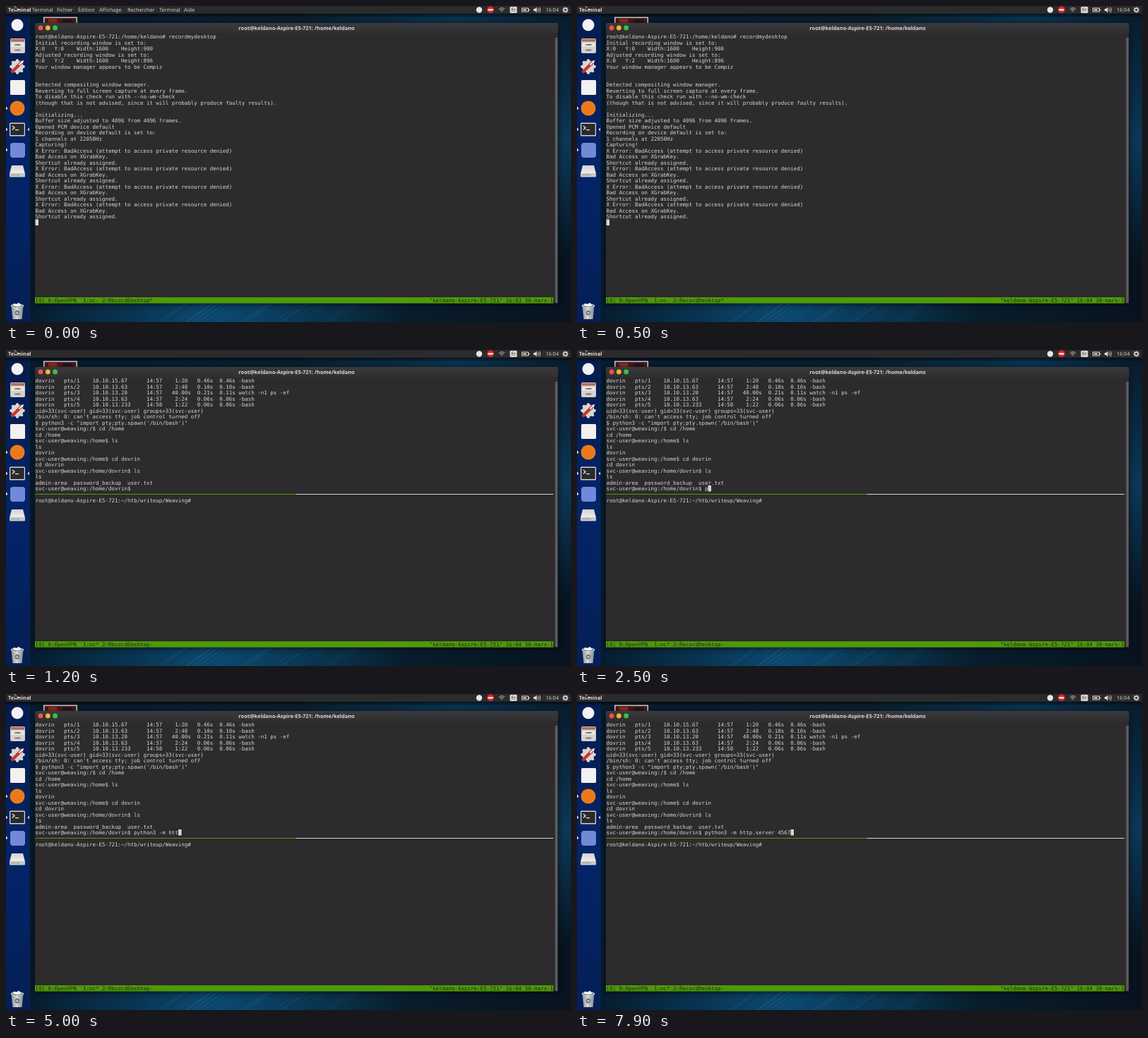
Animation of 800x448 px, one loop 8 s. Source, as an HTML page with a canvas:

```html
<!DOCTYPE html>
<html lang="fr">
<head>
<meta charset="utf-8">
<title>Terminal</title>
<style>
html, body { margin: 0; width: 100%; height: 100%; overflow: hidden; background: #071522; }
canvas { display: block; width: 800px; height: 448px; }
</style>
</head>
<body>
<canvas id="stage" width="800" height="448"></canvas>
<script>
const ctx = document.getElementById('stage').getContext('2d');
const LOOP = 8000;
const CELL = { x: 41.5, y: 39, w: 4.5, h: 8.5, cols: 163 };
const MONO = '14.95px "DejaVu Sans Mono", monospace';
const SANS = '14.6px "Open Sans", sans-serif';
const BOLD = 'bold 14.8px "Open Sans", sans-serif';
const INK = '#d6d6d4', DARK = '#2d2b2e', GREEN = '#4e9a06';

const HOST = 'root@keldano-Aspire-E5-721:';
const SHELL = 'svc-user@weaving:';

const denied = [
  'X Error: BadAccess (attempt to access private resource denied)',
  'Bad Access on XGrabKey.',
  'Shortcut already assigned.'
];
const recordLog = [
  HOST + '/home/keldano# recordmydesktop',
  'Initial recording window is set to:',
  'X:0   Y:0    Width:1600    Height:900',
  'Adjusted recording window is set to:',
  'X:0   Y:2    Width:1600    Height:896',
  'Your window manager appears to be Compiz',
  '', '',
  'Detected compositing window manager.',
  'Reverting to full screen capture at every frame.',
  'To disable this check run with --no-wm-check',
  '(though that is not advised, since it will probably produce faulty results).',
  '',
  'Initializing...',
  'Buffer size adjusted to 4096 from 4096 frames.',
  'Opened PCM device default',
  'Recording on device default is set to:',
  '1 channels at 22050Hz',
  'Capturing!',
  ...denied, ...denied, ...denied, ...denied
];

const session = (pts, ip, login, idle, jcpu, pcpu, what) =>
  'dovrin'.padEnd(9) + ('pts/' + pts).padEnd(9) + ip.padEnd(17) + login.padEnd(8) +
  idle + jcpu.padStart(7) + pcpu.padStart(7) + ' ' + what;
const shellLog = [
  session(1, '10.10.15.67', '14:57', ' 1:20 ', '0.46s', '0.46s', '-bash'),
  session(2, '10.10.13.63', '14:57', ' 2:48 ', '0.10s', '0.10s', '-bash'),
  session(3, '10.10.13.20', '14:57', '40.00s', '0.21s', '0.11s', 'watch -n1 ps -ef'),
  session(4, '10.10.13.63', '14:57', ' 2:24 ', '0.06s', '0.06s', '-bash'),
  session(5, '10.10.13.233', '14:58', ' 1:22 ', '0.06s', '0.06s', '-bash'),
  'uid=33(svc-user) gid=33(svc-user) groups=33(svc-user)',
  "/bin/sh: 0: can't access tty; job control turned off",
  `$ python3 -c "import pty;pty.spawn('/bin/bash')"`,
  SHELL + '/$ cd /home',
  'cd /home',
  SHELL + '/home$ ls',
  'ls',
  'dovrin',
  SHELL + '/home$ cd dovrin',
  'cd dovrin',
  SHELL + '/home/dovrin$ ls',
  'ls',
  'admin-area  password_backup  user.txt'
];
const PROMPT = SHELL + '/home/dovrin$ ';
const COMMAND = 'python3 -m http.server 4567';
// Time of each keystroke of COMMAND
const KEYS = [
  2500, 2600, 2700, 2800, 2900, 3000, 3600, 3800, 3900,
  4300, 4500, 4700, 4800, 4900, 5100,
  5400, 5500, 5700, 5700, 5900, 6000, 6100, 6200,
  7600, 7700, 7800, 7900
];
const BLINK_OFF = [[1200, 1900], [6800, 7500]];

function rect(x, y, w, h, fill) {
  ctx.fillStyle = fill;
  ctx.fillRect(x, y, w, h);
}
function round(x, y, w, h, r, fill) {
  ctx.fillStyle = fill;
  ctx.beginPath();
  ctx.roundRect(x, y, w, h, r);
  ctx.fill();
}
function oval(x, y, rx, ry, fill) {
  ctx.fillStyle = fill;
  ctx.beginPath();
  ctx.ellipse(x, y, rx, ry, 0, 0, 7);
  ctx.fill();
}
const disc = (x, y, r, fill) => oval(x, y, r, r, fill);
function poly(fill, ...pts) {
  ctx.fillStyle = fill;
  ctx.beginPath();
  pts.forEach(([x, y]) => ctx.lineTo(x, y));
  ctx.closePath();
  ctx.fill();
}
function stroke(color, width, ...pts) {
  ctx.strokeStyle = color;
  ctx.lineWidth = width;
  ctx.beginPath();
  pts.forEach(([x, y]) => ctx.lineTo(x, y));
  ctx.stroke();
}
function arc(x, y, r, from, to, color, width) {
  ctx.strokeStyle = color;
  ctx.lineWidth = width;
  ctx.beginPath();
  ctx.arc(x, y, r, from, to);
  ctx.stroke();
}
// The desktop is laid out at 1600 px and shown at half size
function text(s, x, y, font, fill, align = 'left') {
  ctx.save();
  ctx.scale(.5, .5);
  ctx.font = font;
  ctx.textRendering = 'geometricPrecision';
  ctx.textAlign = align;
  ctx.fillStyle = fill;
  ctx.fillText(s, x * 2, y * 2);
  ctx.restore();
}
function gradient(x0, y0, x1, y1, ...stops) {
  const g = ctx.createLinearGradient(x0, y0, x1, y1);
  stops.forEach(([at, color]) => g.addColorStop(at, color));
  return g;
}
function glow(x, y, r, rgb, alpha) {
  const g = ctx.createRadialGradient(x, y, 0, x, y, r);
  g.addColorStop(0, `rgba(${rgb},${alpha})`);
  g.addColorStop(1, `rgba(${rgb},0)`);
  rect(0, 0, 800, 448, g);
}
const noise = i => Math.abs(Math.sin(i * 127.1) * 43758.5) % 1;
const cellX = col => CELL.x + col * CELL.w;
const cellY = row => CELL.y + row * CELL.h;
const put = (s, col, row, fill = INK) => text(s, cellX(col), cellY(row) + 7, MONO, fill);
const cursor = (col, row) => rect(cellX(col), cellY(row), CELL.w, CELL.h, INK);

function wallpaper() {
  rect(0, 0, 800, 448, gradient(0, 0, 800, 0,
    [0, '#061b2e'], [.6, '#08202f'], [1, '#071320']));
  glow(300, 450, 270, '11,80,124', .85);
  glow(640, 0, 220, '12,62,98', .7);
  glow(800, 190, 170, '13,66,102', .8);
  for (let i = 0; i < 45; i++) {
    const x = 190 + 280 * noise(i);
    stroke(`rgba(110,180,220,${.16 * noise(i + 60)})`, 1, [x, 450], [x + 42, 420]);
  }
  rect(53, 15.5, 48, 9, '#d9d4d0');
  rect(54.5, 17, 45, 8, '#4c1a1c');
  rect(60, 18, 12, 6, '#8c2a26');
  rect(80, 19, 14, 5, '#251517');
}

function launcher() {
  rect(0, 11, 33, 437, gradient(0, 11, 0, 448,
    [0, '#051c4c'], [.5, '#04246a'], [1, '#041f56']));
  rect(32.5, 11, .7, 437, '#0c2f66');

  disc(16, 27, 8.5, '#f2f2f4');

  round(6, 46, 21, 21, 2, '#c9c5c1');
  rect(7, 47, 19, 3.5, '#b9695c');
  rect(7, 51.5, 19, 7, '#e6e3df');
  rect(7, 59.5, 19, 6.5, '#d6d2ce');
  rect(12.5, 54, 8, 2, '#7d7977');
  rect(12.5, 61.5, 8, 2, '#7d7977');

  for (let i = 0; i < 8; i++) {
    const a = i * Math.PI / 4;
    disc(16 + 8.5 * Math.cos(a), 86 + 8.5 * Math.sin(a), 2.3, '#d8d6d4');
  }
  disc(16, 86, 8.5, '#d8d6d4');
  ctx.lineCap = 'round';
  stroke('#c5352b', 4.5, [9, 93], [21, 81]);
  stroke('#f4f2f0', 2, [19, 83], [24, 78]);
  ctx.lineCap = 'butt';

  round(6, 105, 21, 21, 1.5, '#f3f1ee');
  disc(16, 145, 10.5, '#ec7a1c');

  round(5, 165.5, 22, 19, 1.5, '#d4d4d2');
  rect(6.3, 167, 19.4, 16, '#2a2a2c');
  stroke('#f0f0f0', 1.3, [9, 170], [12, 172.7], [9, 175.4]);
  rect(13, 175, 5, 1.2, '#f0f0f0');

  round(6, 194, 21, 21, 4, '#7289da');

  poly(gradient(0, 226, 0, 238, [0, '#d2d2d4'], [1, '#f0f0f0']),
    [8, 226], [24, 226], [27, 238], [5, 238]);
  round(5, 237, 22, 5.5, 1, '#c9c9cb');
  rect(7, 239, 13, 1, '#98989a');

  poly(gradient(8, 0, 24, 0, [0, '#8f9598'], [.45, '#d5d8d9'], [1, '#858b8e']),
    [7.5, 425], [24.5, 425], [22.5, 444], [9.5, 444]);
  disc(16, 435, 3.4, '#6f7679');
  disc(16, 435, 1.6, '#c4c8ca');
  oval(16, 425, 9.3, 2.8, '#e3e6e7');
  oval(16, 425, 7.8, 1.9, '#4a4f53');
  poly('#f3f3f3', [9.5, 425], [11, 421.5], [15, 423], [18, 420.5], [22.5, 425], [16, 426.5]);

  [145, 175, 204].forEach(y => poly('#e8e8ea', [0, y - 2.5], [2.5, y], [0, y + 2.5]));
  poly('#e8e8ea', [33, 172.5], [30.5, 175], [33, 177.5]);
}

function panel(menuAlpha) {
  const light = '#dfdbd2';
  rect(0, 11, 800, 6, gradient(0, 11, 0, 17, [0, 'rgba(0,0,0,.6)'], [1, 'rgba(0,0,0,0)']));
  rect(0, 0, 800, 11, '#2b2a2c');
  text('Terminal', 3, 7.6, BOLD, light);
  ctx.globalAlpha = menuAlpha;
  [['Terminal', 37], ['Fichier', 72], ['Édition', 102], ['Affichage', 132],
   ['Rechercher', 172], ['Terminal', 217], ['Aide', 252]]
    .forEach(([s, x]) => text(s, x, 7.6, SANS, light));
  ctx.globalAlpha = 1;

  disc(670, 5.5, 4.2, '#e8e8e8');
  disc(686, 5.3, 5, '#d8232a');
  rect(682.5, 4.3, 7, 2.2, '#fff');
  for (let i = 1; i < 4; i++) arc(702, 9, i * 2.1, -2.3, -.84, '#b9b6b0', 1);
  round(713.5, 1, 10, 9, 1.2, light);
  text('Fr', 718.5, 7.8, SANS, '#2b2a2c', 'center');
  ctx.strokeStyle = light;
  ctx.lineWidth = 1;
  ctx.strokeRect(730.5, 3, 9, 5);
  rect(740, 4.5, 1.3, 2, light);
  rect(732, 4.5, 5, 2, light);
  poly(light, [747, 4], [749, 4], [751.5, 1.5], [751.5, 9.5], [749, 7], [747, 7]);
  for (let i = 1; i < 4; i++) arc(751, 5.5, i * 1.9, -.8, .8, light, .8);
  text('16:04', 764, 8, SANS, light);
  for (let i = 0; i < 8; i++) {
    const a = i * Math.PI / 4;
    stroke(light, 1.3, [792, 5.5], [792 + 4.3 * Math.cos(a), 5.5 + 4.3 * Math.sin(a)]);
  }
  disc(792, 5.5, 3, light);
  disc(792, 5.5, 1.6, '#2b2a2c');

  poly('#fff', [12, -1], [12, 8], [14.2, 6.2], [18, 6]);
  poly('#111', [12.6, 0], [12.6, 6.8], [14, 5.6], [16.6, 5.4]);
}

function frame() {
  ctx.save();
  ctx.shadowColor = 'rgba(0,0,0,.6)';
  ctx.shadowBlur = 10;
  ctx.shadowOffsetY = 2;
  round(41, 24, 740.5, 397.5, [3, 3, 0, 0], DARK);
  ctx.restore();
  round(41, 24, 740.5, 14.5, [3, 3, 0, 0], gradient(0, 24, 0, 38, [0, '#3a393b'], [1, '#302f31']));
  disc(49, 31, 3.4, '#f4524c');
  disc(59.3, 31, 3.4, '#f5b52e');
  disc(69.6, 31, 3.4, '#35c148');
  text('root@keldano-Aspire-E5-721: /home/keldano', 411.5, 33.7, BOLD, '#dcdad6', 'center');
  rect(777.5, 45, 3.5, 376, '#5e5c5f');
}

function statusBar(windows, clock) {
  rect(41, cellY(44), CELL.cols * CELL.w + .5, CELL.h, GREEN);
  put('[0] 0:OpenVPN  ' + windows, 0, 44, '#1f2a18');
  put(`"keldano-Aspire-E5-721" ${clock} 30-mars-1`, 124, 44, '#1f2a18');
}

function recordWindow(t) {
  recordLog.forEach((s, row) => put(s, 0, row));
  cursor(0, recordLog.length);
  statusBar('1:nc- 2:RecordDesktop*', t < 500 ? '16:03' : '16:04');
}

function shellWindow(t) {
  shellLog.forEach((s, row) => put(s, 0, row));
  const line = PROMPT + COMMAND.slice(0, KEYS.filter(k => k <= t).length);
  put(line, 0, 18);
  if (!BLINK_OFF.some(([a, b]) => t >= a && t < b)) cursor(line.length, 18);
  rect(41.5, 204, 369, 1, GREEN);
  rect(410.5, 204, 364.5, 1, INK);
  put(HOST + '~/htb/writeup/Weaving#', 0, 20);
  statusBar('1:nc* 2:RecordDesktop-', '16:04');
}

function draw(now) {
  const t = now % LOOP;
  wallpaper();
  launcher();
  panel(t < 400 ? 1 : t < 500 ? .5 : 0);
  frame();
  if (t < 600) recordWindow(t);
  else shellWindow(t);
}

const start = performance.now();
function tick() {
  draw(performance.now() - start);
  requestAnimationFrame(tick);
}
tick();
</script>
</body>
</html>
```
